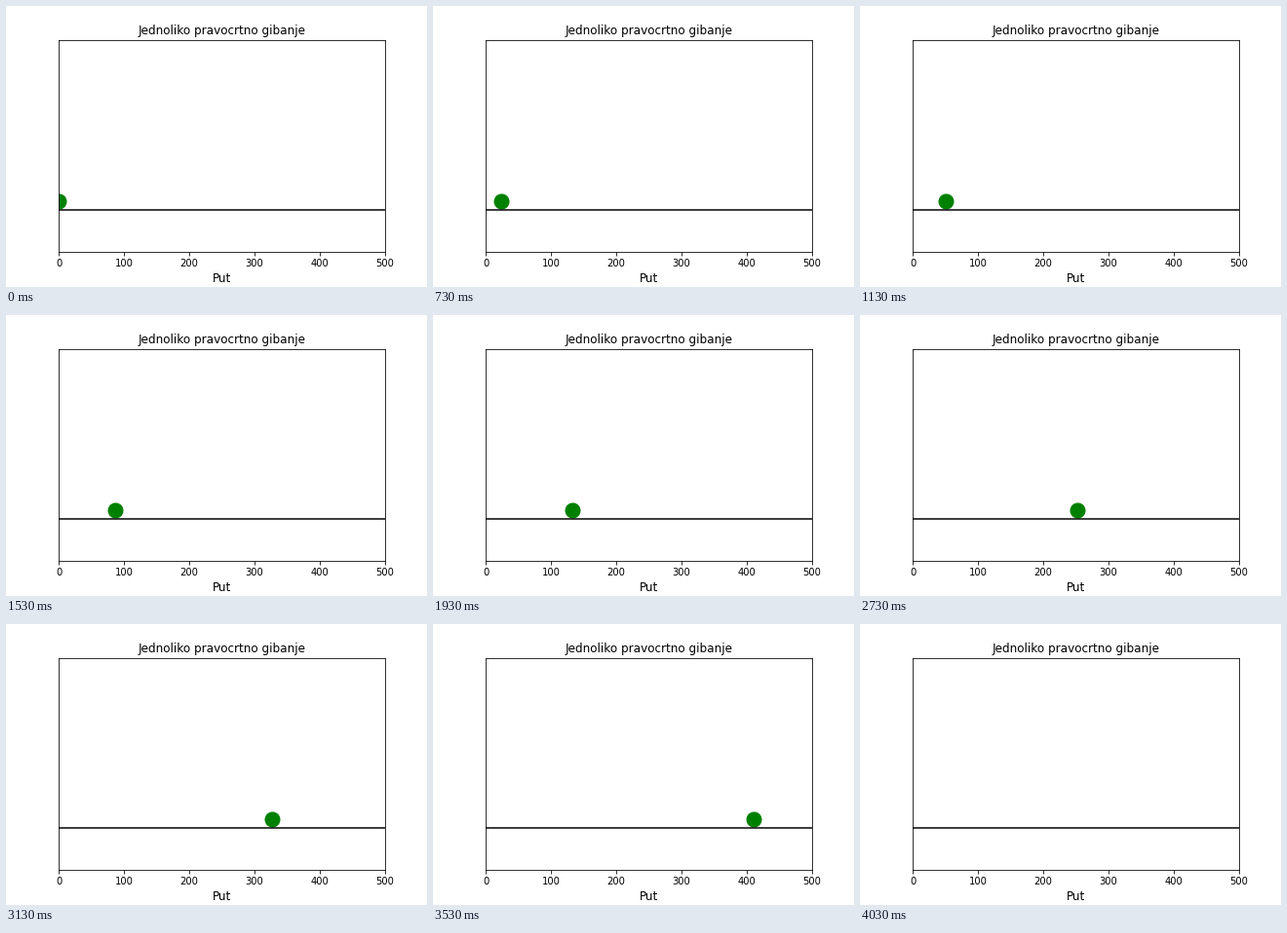
Animation of 432x288 px, one loop 4.15 s. Source, as a matplotlib script:

```python
import matplotlib.pyplot as plt
from matplotlib.animation import FuncAnimation

DPI = 72
LOOP_MS = 4150
TICK_MS = 10       # resolution of the animation clock
FIRST_MS = 30      # the opening pose is shorter than the others
STEP_MS = 100
LAST_STEP = 41

plt.rcParams["font.family"] = "DejaVu Sans"

fig = plt.figure(figsize=(432 / DPI, 288 / DPI), dpi=DPI, facecolor="white")
fig.subplots_adjust(left=0.125, right=0.9, bottom=0.125, top=0.88)

ax = fig.add_subplot()
ax.set_xlim(0, 500)
ax.set_ylim(-5, 20)
ax.set_yticks([])
ax.set_title("Jednoliko pravocrtno gibanje", fontsize=12)
ax.set_xlabel("Put", fontsize=12)

ball, = ax.plot([], [], "o", color="green", markersize=15)
ax.axhline(0, color="black", linewidth=1.5)


def step_at(ms):
    if ms < FIRST_MS:
        return 0
    return min((ms - FIRST_MS) // STEP_MS + 1, LAST_STEP)


def update(frame):
    # constant acceleration: distance grows with the square of time
    distance = 0.3 * (step_at(frame * TICK_MS) + 1) ** 2
    ball.set_data([distance], [1])
    return ball,


anim = FuncAnimation(fig, update, frames=LOOP_MS // TICK_MS,
                     interval=TICK_MS, repeat=True, repeat_delay=0)
plt.show()
```
